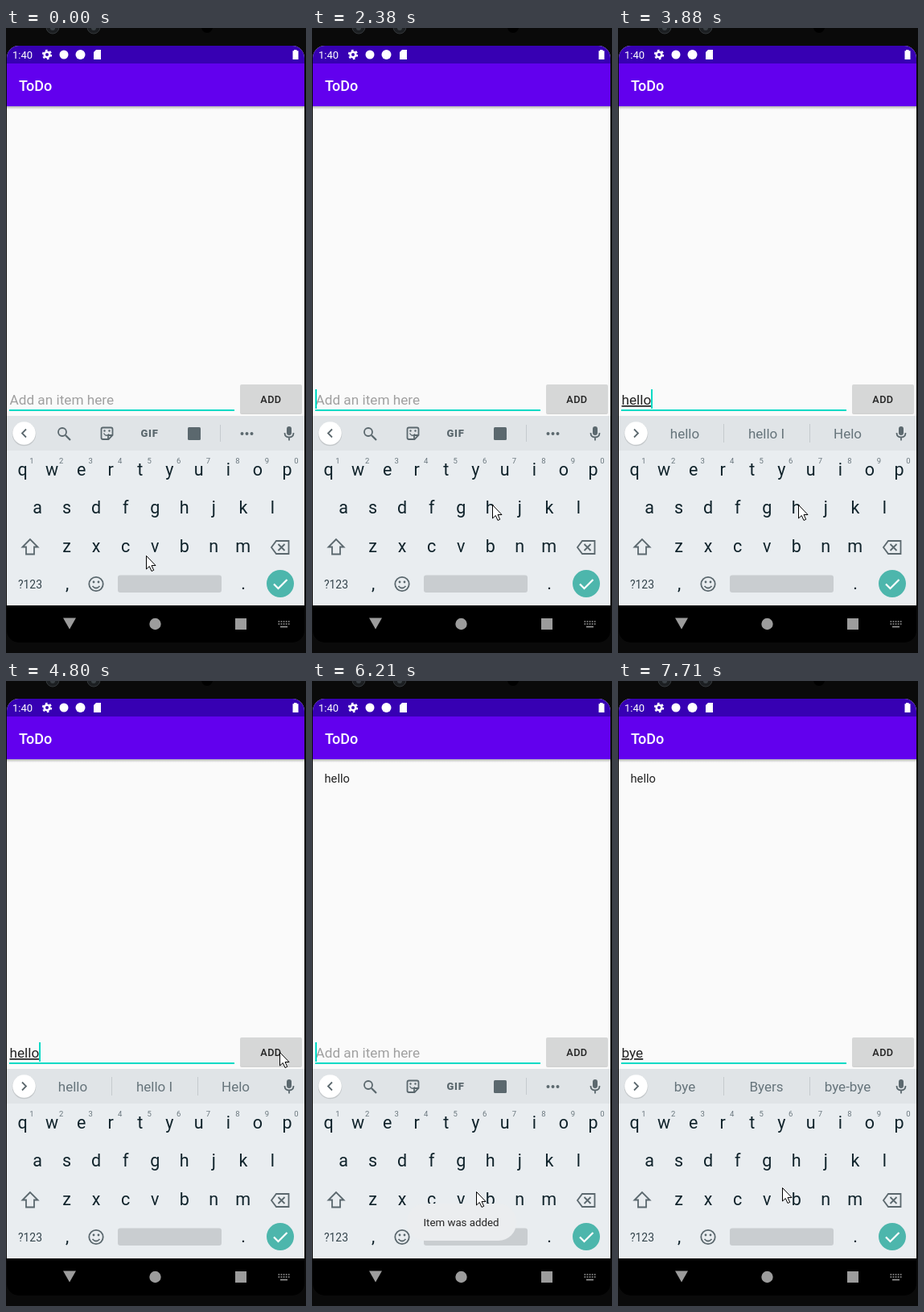
An HTML page that plays this animation: 373x775 px, repeating every 8000 ms.

```html
<!DOCTYPE html>
<html lang="en">
<head>
<meta charset="utf-8">
<title>List app demo</title>
<style>
  html, body { margin: 0; width: 100%; height: 100%; overflow: hidden; background: #0a0a0a; }
  svg { display: block; width: 100%; height: 100%; font-family: Roboto, sans-serif; }
  .icon { fill: none; stroke: #5b686e; stroke-width: 1.8; }
  .solid { fill: #5b686e; }
  .letter { font-size: 21.5px; fill: #10232b; text-anchor: middle; }
  .digit { font-size: 9.5px; fill: #6a777e; text-anchor: middle; }
  .word { font-size: 17px; fill: #66747b; text-anchor: middle; }
  .entry { font-size: 17.2px; }
</style>
</head>
<body>
<svg viewBox="0 0 373 775">
  <defs>
    <linearGradient id="shade" x2="0" y2="1">
      <stop stop-color="#000" stop-opacity=".28"/>
      <stop offset="1" stop-color="#000" stop-opacity="0"/>
    </linearGradient>
    <clipPath id="screen"><rect x="1" y="22" width="370" height="740" rx="15"/></clipPath>
  </defs>

  <rect width="373" height="775" fill="#0a0a0a"/>
  <g fill="#1c1f22" stroke="#34383b">
    <circle cx="58" cy="-1" r="8"/><circle cx="109" cy="-1" r="8"/>
  </g>
  <circle cx="58" cy="0" r="3" fill="#3b4146"/>
  <circle cx="109" cy="0" r="3" fill="#3b4146"/>
  <circle cx="250" cy="-1" r="7" fill="#000"/>

  <g clip-path="url(#screen)">
    <rect y="22" width="373" height="460" fill="#fafafa"/>
    <rect y="22" width="373" height="22" fill="#3700b3"/>
    <rect y="44" width="373" height="53" fill="#6200ee"/>
    <rect y="97" width="373" height="4" fill="url(#shade)"/>
    <rect y="481" width="373" height="43" fill="#e0e4e7"/>
    <rect y="524" width="373" height="193" fill="#e9edf0"/>
    <rect y="716" width="373" height="46" fill="#000"/>
  </g>

  <!-- status bar -->
  <g fill="#fff">
    <text x="8" y="38" font-size="13">1:40</text>
    <circle cx="51" cy="33" r="3.3" fill="none" stroke="#fff" stroke-width="2.6"/>
    <circle cx="51" cy="33" r="5.2" fill="none" stroke="#fff" stroke-width="2" stroke-dasharray="2.6 2.845"/>
    <circle cx="72" cy="33" r="5.5"/>
    <circle cx="92.500" cy="33" r="6"/>
    <path d="M112 27h6v12h-9V30z"/>
    <path d="M358 27h3.500v1.300h2V39h-7V28.300h1.500z"/>
    <text x="16" y="78" font-size="18" font-weight="500">ToDo</text>
  </g>

  <text id="item" x="15.500" y="125.500" font-size="14.700" fill="#222">hello</text>

  <!-- entry row -->
  <text id="hint" class="entry" x="4.500" y="467" fill="#a0a0a0">Add an item here</text>
  <text id="typed" class="entry" x="4.500" y="467" fill="#222" text-decoration="underline"></text>
  <rect x="4" y="473" width="280" height="2" fill="#03dac5"/>
  <rect id="caret" y="448" width="2" height="24" fill="#03dac5"/>
  <rect x="291" y="443" width="77" height="36" rx="2" fill="#000" opacity=".16"/>
  <rect x="291" y="442" width="77" height="35.500" rx="2" fill="#d6d7d7"/>
  <rect id="press" x="291" y="442" width="77" height="35.500" rx="2" fill="#000"/>
  <text x="316.300" y="464.500" font-size="12.700" font-weight="500" letter-spacing=".4" fill="#222">ADD</text>

  <!-- strip above the keys -->
  <circle cx="22.500" cy="503.500" r="14.800" fill="#000" opacity=".12"/>
  <circle cx="22.500" cy="502.500" r="14.300" fill="#fff"/>
  <path id="chevron" class="icon" d="M2.500-5L-2.500 0L2.500 5"/>
  <g id="tools">
    <g class="icon">
      <circle cx="70" cy="501" r="5"/><path d="M74 505l6 6" stroke-width="2.200"/>
      <path d="M118.500 497.500q0-2 2-2h10q2 0 2 2v7.500l-5 5h-7q-2 0-2-2z M132 505h-5v5"/>
      <path d="M121.500 502.500q3 5 6.500 1" stroke-width="1.400"/>
    </g>
    <circle class="solid" cx="122.500" cy="499.500" r="1.200"/>
    <circle class="solid" cx="128.500" cy="499.500" r="1.200"/>
    <text class="solid" x="178.500" y="507" font-size="13" font-weight="900" letter-spacing=".7" text-anchor="middle">GIF</text>
    <rect class="solid" x="226" y="495" width="16" height="16" rx="1.500"/>
    <path d="M266.500 492v21" stroke="#c5cace"/>
    <g class="solid">
      <circle cx="293.500" cy="503" r="2"/><circle cx="299.500" cy="503" r="2"/><circle cx="305.500" cy="503" r="2"/>
    </g>
  </g>
  <g id="words">
    <path d="M131.500 491v23M238.500 491v23" stroke="#c5cace"/>
    <text class="word" x="83" y="509"></text>
    <text class="word" x="184.500" y="509"></text>
    <text class="word" x="285.500" y="509"></text>
  </g>
  <rect class="solid" x="349" y="494" width="6" height="11" rx="3"/>
  <path class="icon" d="M346.500 502q0 5.500 5.500 5.500t5.500-5.500M352 507.500v4"/>

  <!-- keyboard -->
  <g id="keys"></g>
  <g class="icon" stroke-width="2">
    <path d="M30 634l-9.500 9.500h4.500v9h10v-9h4.500z"/>
    <path d="M336 636h15.500v16H336l-6-8z"/>
    <path d="M338.500 640l8 8m0-8l-8 8"/>
    <circle cx="112" cy="689.500" r="8.700"/>
    <path d="M107.500 692q4.500 5 9 0"/>
  </g>
  <circle class="solid" cx="109" cy="687" r="1.400"/>
  <circle class="solid" cx="115" cy="687" r="1.400"/>
  <text x="30" y="694.500" font-size="13.900" fill="#33434b" text-anchor="middle">?123</text>
  <rect x="139" y="678.500" width="129" height="21.500" rx="3" fill="#c9cdd0"/>
  <circle cx="341" cy="689" r="17" fill="#4db6ac"/>
  <path d="M333 689.500l5.500 5.500l11-11" fill="none" stroke="#fff" stroke-width="2.200"/>

  <!-- navigation bar -->
  <g fill="#9c9c9c">
    <path d="M71 731.500h16l-8 14z"/>
    <circle cx="185.500" cy="739" r="7.200"/>
    <rect x="285" y="732" width="14" height="14"/>
    <path d="M338.500 736h14M338.500 739h14" stroke="#9c9c9c" stroke-width="1.700" stroke-dasharray="1.700 1.400"/>
    <path d="M341 742.500h9" stroke="#9c9c9c" stroke-width="1.600"/>
  </g>

  <g id="toast">
    <rect x="118" y="648" width="136" height="46" rx="22" fill="#ebedef"/>
    <text x="185.500" y="676" font-size="13.300" fill="#252525" text-anchor="middle">Item was added</text>
  </g>
  <path id="pointer" d="M.5.500V17L4.300 13.500L7 19.500L9.700 18.300L7 12.500H12z" fill="#fff" stroke="#000" stroke-width="1"/>
</svg>

<script>
const LOOP = 8000;
const $ = id => document.getElementById(id);

// time, entry text, three suggestions
const ENTRIES = [
  [0, ''],
  [2660, 'h', 'h', 'he', 'have'],
  [2800, 'he', 'he', 'hey', 'her'],
  [2930, 'hel', 'hel', 'he', 'hello'],
  [3760, 'hell', 'hell', 'hello', 'held'],
  [3880, 'hello', 'hello', 'hello I', 'Helo'],
  [5000, ''],
  [6920, 'b', 'b', 'be', 'but'],
  [7050, 'by', 'by', 'my', 'bye'],
  [7190, 'bye', 'bye', 'Byers', 'bye-bye'],
];
const CARET_TOGGLES = [180, 680, 1180, 1680, 2180, 3330, 3760, 4410, 4800, 5480, 5980, 6480, 6920, 7710];

// time, x, y
const POINTER = [
  [0, 174, 654], [120, 174, 654], [400, 176, 640], [780, 174, 624], [1060, 174, 619],
  [1180, 174, 619], [1960, 227, 592], [2110, 226, 593], [2380, 224, 591],
  [4350, 224, 591], [4800, 340, 460], [5450, 340, 460],
  [5930, 213, 656], [6210, 204, 633], [6350, 204, 628], [LOOP, 204, 628],
];

const ramp = (t, from, to) => Math.min(1, Math.max(0, (t - from) / (to - from)));
const show = (id, visible) => $(id).setAttribute('visibility', visible ? 'visible' : 'hidden');

function addText(className, x, y, content) {
  const node = document.createElementNS('http://www.w3.org/2000/svg', 'text');
  node.setAttribute('class', className);
  node.setAttribute('x', x);
  node.setAttribute('y', y);
  node.textContent = content;
  $('keys').append(node);
}

function buildKeys() {
  const row = (letters, x, y) =>
    [...letters].forEach((letter, i) => addText('letter', x + 36.55 * i, y, letter));
  row('qwertyuiop', 20.5, 554.5);
  row('asdfghjkl', 39, 602);
  row('zxcvbnm', 75.5, 649.5);
  [...'1234567890'].forEach((digit, i) => addText('digit', 32 + 36.55 * i, 539.5, digit));
  addText('letter', 76, 696, ',');
  addText('letter', 295, 696, '.');
}

function pointerAt(t) {
  const next = Math.max(1, POINTER.findIndex(point => point[0] > t));
  const [t0, x0, y0] = POINTER[next - 1];
  const [t1, x1, y1] = POINTER[next];
  const k = ramp(t, t0, t1);
  return [x0 + (x1 - x0) * k, y0 + (y1 - y0) * k];
}

function draw(t) {
  const [, entry, ...words] = ENTRIES.filter(e => e[0] <= t).pop();
  const typing = entry !== '';
  $('typed').textContent = entry;
  show('hint', !typing);
  show('tools', !typing);
  show('words', typing);
  document.querySelectorAll('.word').forEach((node, i) => node.textContent = words[i] || '');
  $('chevron').setAttribute('transform', `translate(22.5 502.5) scale(${typing ? -1 : 1} 1)`);

  $('caret').setAttribute('x', typing ? Math.round(4.3 + $('typed').getComputedTextLength()) : 4);
  show('caret', CARET_TOGGLES.filter(time => time <= t).length % 2);

  show('item', t >= 5000);
  $('press').setAttribute('opacity', 0.14 * ramp(t, 4940, 5000) * (1 - ramp(t, 5080, 5370)));
  $('toast').setAttribute('opacity', ramp(t, 5080, 5370) * (1 - ramp(t, 6920, 7180)));
  $('pointer').setAttribute('transform', `translate(${pointerAt(t)})`);
}

const start = performance.now();
function tick() {
  draw((performance.now() - start) % LOOP);
  requestAnimationFrame(tick);
}
buildKeys();
tick();
</script>
</body>
</html>
```
